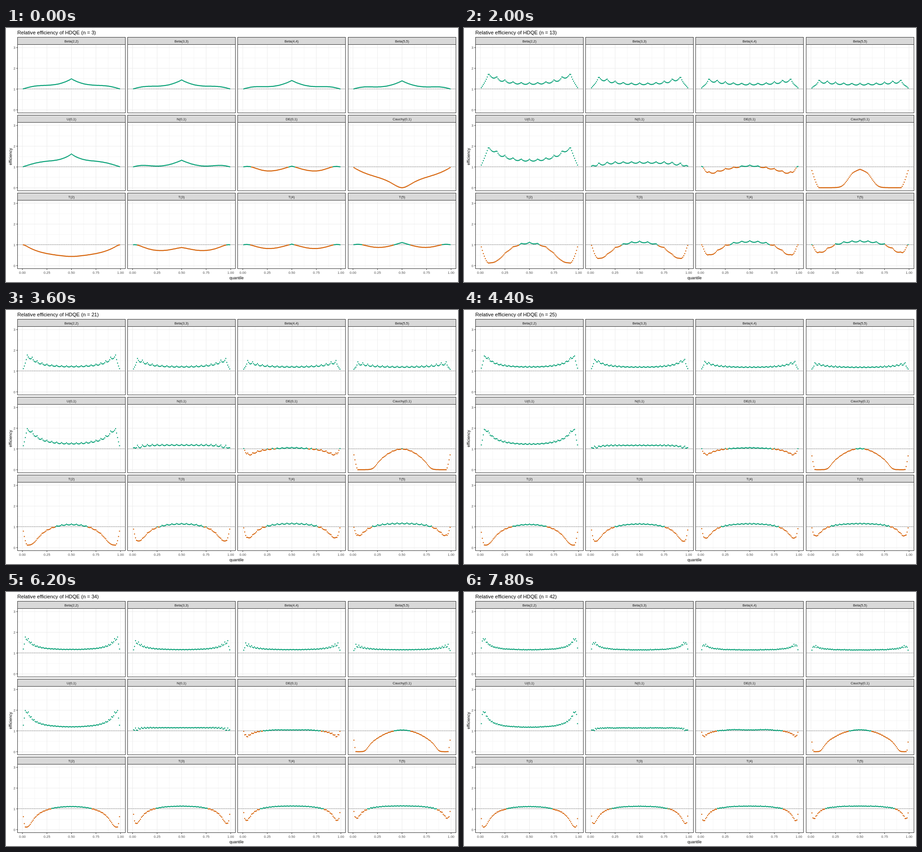
An HTML page for the animation above (8000 ms loop, 998 by 561 pixels).

```html
<!DOCTYPE html>
<html lang="en">
<head>
<meta charset="utf-8">
<title>Relative efficiency</title>
<style>
  html, body { margin: 0; width: 100%; height: 100%; overflow: hidden; background: #fff; }
  svg { display: block; width: 100vw; height: 100vh; font-family: "Liberation Sans", Arial, sans-serif; }
  text { text-anchor: middle; font-size: 7.6px; fill: #4d4d4d; }
  .strip { fill: #1a1a1a; }
  .axis { font-size: 9px; fill: #000; }
  .title { font-size: 11.2px; fill: #000; text-anchor: start; }
  .end { text-anchor: end; }
  .dots { fill: none; stroke-width: 2.5; stroke-linecap: round; }
</style>
</head>
<body>
<svg id="stage" viewBox="0 0 998 561" preserveAspectRatio="none"></svg>
<script>
const STEP = 200, FIRST = 3, LAST = 42;
const SAMPLES = 10000, DRAWS = SAMPLES * LAST, MIN_TAIL = 3.2e-5;
const GREEN = '#009E73', ORANGE = '#D55E00';

// Each law is symmetric: a density over z >= 0 and a map from z to x.
const beta = a => ({ density: z => Math.cos(z) ** (2 * a - 1), map: Math.sin, top: Math.PI / 2 });
const student = v => ({ density: z => Math.cos(z) ** (v - 1), map: Math.tan, top: Math.PI / 2 });
const normal = { density: z => Math.exp(-z * z / 2), map: z => z, top: 6 };
const laplace = { density: z => Math.exp(-z), map: z => z, top: 16 };
const laws = [
  ['Beta(2,2)', beta(2)], ['Beta(3,3)', beta(3)], ['Beta(4,4)', beta(4)], ['Beta(5,5)', beta(5)],
  ['U(0,1)', beta(1)], ['N(0,1)', normal], ['DE(0,1)', laplace], ['Cauchy(0,1)', student(1)],
  ['T(2)', student(2)], ['T(3)', student(3)], ['T(4)', student(4)], ['T(5)', student(5)]
];

// ---- statistics ----

function random(seed) {
  return () => {
    seed = seed + 0x6D2B79F5 | 0;
    let t = Math.imul(seed ^ seed >>> 15, 1 | seed);
    t = t + Math.imul(t ^ t >>> 7, 61 | t) ^ t;
    return ((t ^ t >>> 14) >>> 0) / 4294967296;
  };
}

// Shuffled ranks, cut into sorted samples of the largest size.
function drawRanks() {
  const next = random(7), ranks = new Uint32Array(DRAWS).map((_, i) => i);
  for (let i = DRAWS - 1; i > 0; i--) {
    const j = Math.floor(next() * (i + 1)), r = ranks[i];
    ranks[i] = ranks[j];
    ranks[j] = r;
  }
  for (let s = 0; s < DRAWS; s += LAST) ranks.subarray(s, s + LAST).sort();
  return ranks;
}

function quantileTable({ density, map, top }) {
  const cells = 8000, h = top / cells, table = new Float64Array(DRAWS);
  const mass = Float64Array.from({ length: cells }, (_, c) => density((c + 0.5) * h));
  const total = 2 * mass.reduce((a, b) => a + b, 0);
  let c = cells - 1, above = 0;
  for (let k = 0; k < DRAWS / 2; k++) {
    const tail = total * Math.max((k + 0.5) / DRAWS, MIN_TAIL);
    while (c > 0 && above + mass[c] < tail) above += mass[c--];
    const x = map((c + 1 - (tail - above) / mass[c]) * h);
    table[k] = -x;
    table[DRAWS - 1 - k] = x;
  }
  return table;
}

// First and product moments of the order statistics for the largest n.
function topMoments(table, ranks) {
  const n = LAST, sum = new Float64Array(n), prod = new Float64Array(n * n), y = new Float64Array(n);
  for (let s = 0; s < DRAWS; s += n) {
    for (let i = 0; i < n; i++) y[i] = table[ranks[s + i]];
    for (let i = 0; i < n; i++) {
      const yi = y[i], row = i * n;
      sum[i] += yi;
      for (let j = i; j < n; j++) prod[row + j] += yi * y[j];
    }
  }
  const mean = sum.map((v, i) => (v - sum[n - 1 - i]) / (2 * SAMPLES));
  const cross = prod.map((v, k) => {
    const i = Math.floor(k / n), j = k % n;
    return (v + prod[(n - 1 - j) * n + n - 1 - i]) / (2 * SAMPLES);
  });
  return { n, mean, cross };
}

// Moments for n - 1: drop one observation at random.
function shrink({ n, mean, cross }) {
  const m = n - 1, less = { n: m, mean: new Float64Array(m), cross: new Float64Array(m * m) };
  for (let i = 0; i < m; i++) {
    less.mean[i] = ((i + 1) * mean[i + 1] + (m - i) * mean[i]) / n;
    for (let j = i; j < m; j++) {
      less.cross[i * m + j] = ((i + 1) * cross[(i + 1) * n + j + 1]
        + (j - i) * cross[i * n + j + 1] + (m - j) * cross[i * n + j]) / n;
    }
  }
  return less;
}

function lnGamma(x) {
  let s = 0;
  for (; x < 8; x++) s -= Math.log(x);
  return s + (x - 0.5) * Math.log(x) - x + Math.log(2 * Math.PI) / 2 + 1 / (12 * x) - 1 / (360 * x ** 3);
}

function betaCdf(x, a, b) {
  if (x <= 0) return 0;
  if (x >= 1) return 1;
  if (x > (a + 1) / (a + b + 2)) return 1 - betaCdf(1 - x, b, a);
  let f = 1;
  for (let k = 60; k > 0; k--) {
    const m = k >> 1;
    const d = k % 2 ? -(a + m) * (a + b + m) : m * (b - m);
    f = 1 + d * x / ((a + k - 1) * (a + k)) / f;
  }
  const scale = lnGamma(a + b) - lnGamma(a) - lnGamma(b);
  return Math.exp(a * Math.log(x) + b * Math.log(1 - x) + scale) / (a * f);
}

function smoothWeights(n, p) {
  const cdf = i => betaCdf(i / n, (n + 1) * p, (n + 1) * (1 - p));
  const w = [];
  for (let i = 0, low = 0; i < n; i++) {
    const high = cdf(i + 1);
    w.push(high - low);
    low = high;
  }
  return w;
}

function linearWeights(n, p) {
  const h = (n - 1) * p, i = Math.floor(h + 1e-9), w = Array(n).fill(0);
  w[i] = 1 - (h - i);
  w[i + 1] = h - i;
  return w;
}

function squaredError(w, { n, mean, cross }, q) {
  let total = q * q;
  for (let i = 0; i < n; i++) {
    if (!w[i]) continue;
    let row = w[i] * cross[i * n + i];
    for (let j = i + 1; j < n; j++) row += 2 * w[j] * cross[i * n + j];
    total += w[i] * (row - 2 * q * mean[i]);
  }
  return total;
}

// ---- chart ----

const SVG = 'http://www.w3.org/2000/svg';
const stage = document.getElementById('stage');

function add(tag, attrs, content = '') {
  const el = document.createElementNS(SVG, tag);
  for (const key in attrs) el.setAttribute(key, attrs[key]);
  el.textContent = content;
  stage.append(el);
  return el;
}
const line = (x1, y1, x2, y2, stroke, width = 1, more = {}) =>
  add('line', { x1, y1, x2, y2, stroke, 'stroke-width': width, ...more });
const label = (x, y, content, cls = '', more = {}) => add('text', { x, y, class: cls, ...more }, content);
const box = (x, y, width, height, fill) => add('rect', { x, y, width, height, fill, stroke: '#333' });

const xAt = (col, p) => 36.2 + 243.3 * col + 216.6 * p;
const yAt = (row, e) => 180.8 + 172 * row - 45.85 * e;

function drawPanel(col, row, name) {
  const left = Math.floor(25.5 + 243.2 * col) + 0.5, right = left + 238;
  const top = 36.5 + 172 * row, bottom = top + 151;
  for (const odd of [1, 0]) {
    const width = odd ? 0.5 : 1;
    for (let k = odd; k <= 8; k += 2) line(xAt(col, k / 8), top, xAt(col, k / 8), bottom, '#ebebeb', width);
    for (let k = odd; k <= 6; k += 2) line(left, yAt(row, k / 2), right, yAt(row, k / 2), '#ebebeb', width);
  }
  const one = Math.floor(yAt(row, 1)) + 0.5;
  line(left, one, right, one, '#333', 0.9, { 'stroke-dasharray': '1 1.5' });
  box(left, top, 238, 151, 'none');
  box(left, top - 16, 238, 16, '#d9d9d9');
  label(left + 119, top - 5, name, 'strip');
  if (col === 0) {
    for (let e = 0; e <= 3; e++) {
      line(22.7, yAt(row, e), 25, yAt(row, e), '#333');
      label(20.7, yAt(row, e) + 3, e, 'end');
    }
  }
  if (row === 2) {
    for (let k = 0; k <= 4; k++) {
      line(xAt(col, k / 4), 532, xAt(col, k / 4), 534.4, '#333');
      label(xAt(col, k / 4), 542.7, (k / 4).toFixed(2));
    }
  }
}

laws.forEach(([name], k) => drawPanel(k % 4, k >> 2, name));
label(509, 554.5, 'quantile', 'axis');
label(0, 0, 'efficiency', 'axis', { transform: 'translate(12.6 284) rotate(-90)' });
const title = label(25, 13.8, '', 'title');
const greenDots = add('path', { class: 'dots', stroke: GREEN });
const orangeDots = add('path', { class: 'dots', stroke: ORANGE });

// ---- frames ----

function buildFrames() {
  const frames = [], ranks = drawRanks();
  for (let n = FIRST; n <= LAST; n++) {
    const weights = [];
    for (let c = 1; c <= 50; c++) weights.push([linearWeights(n, c / 100), smoothWeights(n, c / 100)]);
    frames.push({ n, weights, green: '', orange: '' });
  }
  laws.forEach(([, law], k) => {
    const table = quantileTable(law), col = k % 4, row = k >> 2;
    let moments = topMoments(table, ranks);
    for (let n = LAST; n >= FIRST; n--) {
      const frame = frames[n - FIRST];
      frame.weights.forEach(([linear, smooth], c) => {
        const p = (c + 1) / 100, at = Math.round(p * DRAWS);
        const q = (table[at - 1] + table[at]) / 2;
        const e = squaredError(linear, moments, q) / squaredError(smooth, moments, q);
        const tone = e >= 1 ? 'green' : 'orange';
        for (const x of new Set([p, 1 - p])) {
          frame[tone] += `M${xAt(col, x).toFixed(2)} ${yAt(row, e).toFixed(2)}h0`;
        }
      });
      if (n > FIRST) moments = shrink(moments);
    }
  });
  return frames;
}

const frames = buildFrames();
let shown = -1;

function show(index) {
  if (index === shown) return;
  shown = index;
  const { n, green, orange } = frames[index];
  title.textContent = `Relative efficiency of HDQE (n = ${n})`;
  greenDots.setAttribute('d', green);
  orangeDots.setAttribute('d', orange);
}

const start = performance.now();
function tick() {
  show(Math.floor((performance.now() - start) / STEP) % frames.length);
  requestAnimationFrame(tick);
}
tick();
</script>
</body>
</html>
```
